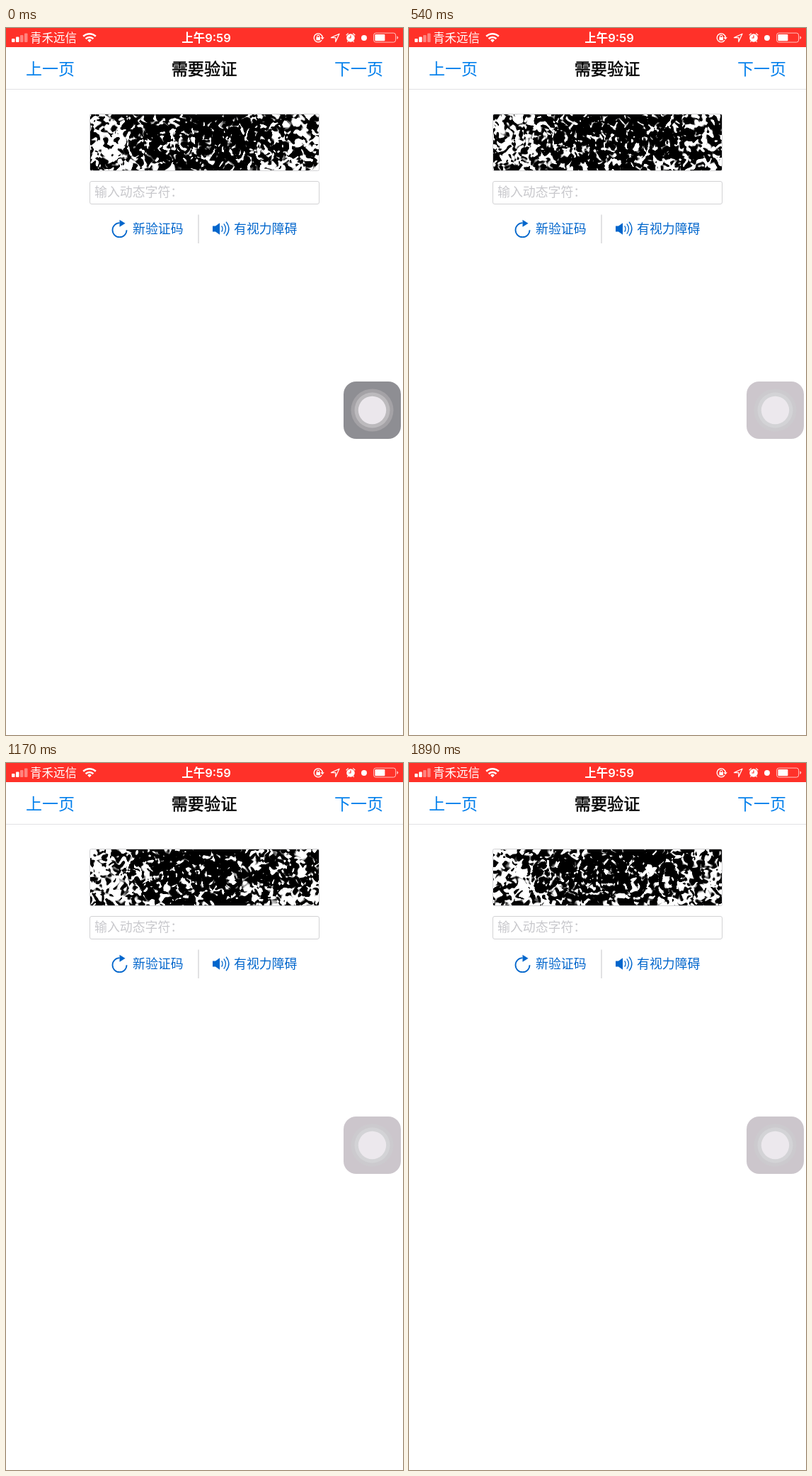
Animation of 561 by 998 pixels, one loop 1920 ms. Source, as an HTML page with a canvas:

```html
<!DOCTYPE html>
<html lang="zh-CN">
<head>
<meta charset="utf-8">
<title>需要验证</title>
<style>
  html, body { margin: 0; width: 100%; height: 100%; overflow: hidden; background: #fff; }
  svg, canvas { position: absolute; display: block; }
  svg { left: 0; top: 0; }
  canvas { left: 119px; top: 122px; }
  text { font-family: Inter, "Noto Sans CJK SC", "Noto Sans CJK", sans-serif; }
  .nav { font-size: 23px; fill: #007fec; font-weight: 300; }
  .title { font-size: 23.2px; font-weight: 500; stroke: #000; stroke-width: .5; }
  .link { font-size: 17.9px; fill: #0066cc; }
  .bar { font-size: 16.5px; fill: #fff; }
  .clock { font-weight: 600; }
</style>
</head>
<body>
<canvas id="noise" width="323" height="79"></canvas>
<svg width="561" height="998" viewBox="0 0 561 998">
  <rect width="561" height="27" fill="#ff3129"/>
  <g fill="#fff">
    <rect x="8" y="15" width="4.5" height="5" rx="1"/>
    <rect x="14" y="12.5" width="4.5" height="7.5" rx="1"/>
    <rect x="20" y="10" width="4.5" height="10" rx="1" opacity=".4"/>
    <rect x="26" y="7.5" width="4.5" height="12.5" rx="1" opacity=".4"/>
  </g>
  <text class="bar" x="34" y="20">青禾远信</text>
  <g fill="none" stroke="#fff" stroke-width="2.6">
    <path d="M109.2 11.8a12.6 12.6 0 0 1 17.6 0"/>
    <path d="M112.6 15.2a7.8 7.8 0 0 1 10.8 0"/>
    <path d="M115.2 17.2a4 4 0 0 1 5.6 0L118 20.2z" fill="#fff" stroke="none"/>
  </g>
  <text class="bar clock" x="283" y="20" text-anchor="middle">上午9:59</text>

  <!-- status icons -->
  <g fill="none" stroke="#fff" stroke-width="1.4">
    <path d="M446.2 17.2a6 6 0 1 1 1-3.6"/>
    <path d="M444.4 13.2h5.4l-2.7 3.2z" fill="#fff" stroke="none"/>
    <rect x="438.4" y="13" width="5.6" height="4.4" fill="#fff" stroke="none"/>
    <path d="M439.6 13v-1.3a1.6 1.6 0 0 1 3.2 0V13" stroke-width="1.1"/>
    <path d="M459.4 13.6L471 8.2l-5.2 11.4v-6z" stroke-width="1.2" stroke-linejoin="round"/>
    <circle cx="487" cy="14" r="5.8" fill="#fff" stroke="none"/>
    <path d="M480.7 10.3l3-2.9M493.3 10.3l-3-2.9M483.4 18.4l-1 1.4M490.6 18.4l1 1.4" stroke-width="1.2"/>
    <path d="M487 10.4V14h-2.8" stroke="#ff3129" stroke-width="1.2"/>
    <circle cx="506" cy="14" r="4" fill="#fff" stroke="none"/>
    <rect x="519.6" y="7.1" width="31" height="13" rx="3" stroke-width="1" stroke-opacity=".7"/>
    <rect x="521.4" y="8.9" width="14" height="9.4" rx="1" fill="#fff" stroke="none"/>
    <path d="M552.3 11.3q2 .6 2 2.3t-2 2.3z" fill="#fff" fill-opacity=".7" stroke="none"/>
  </g>

  <!-- header -->
  <path d="M0 86.5H561" stroke="#e2e2e4"/>
  <text class="nav" x="28" y="66">上一页</text>
  <text class="title" x="280" y="66" text-anchor="middle">需要验证</text>
  <text class="nav" x="464" y="66">下一页</text>

  <!-- form -->
  <g fill="none" stroke="#d2d2d4">
    <rect x="118.5" y="121.5" width="324" height="80" rx="2"/>
    <rect x="118.5" y="216.5" width="324" height="32" rx="2.5"/>
    <path d="M272 263.5V304" stroke-width="1.3"/>
  </g>
  <text x="125" y="238" font-size="17.9" fill="#c8c8cc">输入动态字符：</text>
  <g fill="none" stroke="#0066cc" stroke-width="1.8">
    <path d="M160.5 275.2a10 10 0 1 0 10 10"/>
    <path d="M160.5 270.8l8 5-8 5z" fill="#0066cc" stroke="none"/>
    <path d="M292 279.6h4l6-4.4v16.6l-6-4.4h-4z" fill="#0066cc" stroke="none"/>
    <path d="M304.6 279.4q3 4.1 0 8.2M307.8 276.4q5.4 7.1 0 14.2M311 273.6q7.8 9.9 0 19.8" stroke-width="1.3"/>
  </g>
  <text class="link" x="179" y="290.3">新验证码</text>
  <text class="link" x="322" y="290.3">有视力障碍</text>

  <!-- floating button -->
  <rect class="fade" x="477" y="499" width="81" height="81" rx="18"/>
  <circle class="fade" cx="517.5" cy="539.5" r="30"/>
  <circle class="fade" cx="517.5" cy="539.5" r="25"/>
  <circle class="fade" cx="517.5" cy="539.5" r="19.7"/>
</svg>
<script>
const LOOP = 1920, STEP = 30, FADE = 240;
const canvas = document.getElementById("noise");
const ctx = canvas.getContext("2d");
const W = canvas.width, H = canvas.height;
const image = ctx.createImageData(W, H);

// share of white over the picture, 10 columns by 4 rows
const density = [
  [.60, .48, .22, .18, .16, .16, .18, .28, .42, .50],
  [.66, .60, .22, .16, .18, .16, .16, .28, .45, .44],
  [.56, .66, .32, .22, .18, .10, .18, .34, .44, .48],
  [.32, .48, .50, .38, .26, .14, .20, .62, .52, .48]
];
// ghost characters: centre x, centre y, radius x, radius y
const ghosts = [[67, 37, 13, 22], [98, 35, 12, 21], [133, 39, 13, 24],
  [167, 38, 11, 22], [201, 40, 15, 25], [244, 43, 13, 24]];

// ticks at which the picture keeps the previous pattern
const held = new Set([120, 210, 480, 570, 600, 1740]);
for (let t = 660; t < 1700; t += 90) held.add(t);

const mix = (a, b, k) => a + (b - a) * k;
const ease = k => k * k * (3 - 2 * k);

function hash(x, y, seed) {
  let h = Math.imul(x, 374761393) ^ Math.imul(y, 668265263) ^ Math.imul(seed + 1, 1274126177);
  h = Math.imul(h ^ (h >>> 15), 2246822519);
  h = Math.imul(h ^ (h >>> 13), 3266489917);
  return ((h ^ (h >>> 16)) >>> 0) / 4294967296;
}

function bilinear(x, y, at, curve = k => k) {
  const i = Math.floor(x), j = Math.floor(y), u = curve(x - i), v = curve(y - j);
  return mix(mix(at(i, j), at(i + 1, j), u), mix(at(i, j + 1), at(i + 1, j + 1), u), v);
}

const cloud = (x, y, seed) => bilinear(x, y, (i, j) => hash(i, j, seed), ease);
const share = (i, j) => density[Math.min(j, 3)][Math.min(i, 9)];

// dark strokes with a bright rim
function ghost(x, y, tick) {
  let sum = 0;
  ghosts.forEach(([cx, cy, rx, ry], n) => {
    const a = tick / 64 * 2 * Math.PI + n * 1.7;
    const d = Math.hypot((x - cx - 3 * Math.sin(a)) / rx, (y - cy - 2 * Math.cos(a)) / ry);
    if (d > 1.18) return;
    if (d > 1.02) sum += .09;
    else if (d > .6) sum -= .06;
    else if (d > .4) sum += .07;
  });
  return sum;
}

// specks and patches on a grid that is turned and bent, so that no rows show
function speckle(x, y, tick) {
  const bx = x + 7 * cloud(x / 8, y / 8, tick + 100);
  const by = y + 7 * cloud(x / 8, y / 8, tick + 200);
  const u = .8 * bx + .6 * by, v = .8 * by - .6 * bx;
  return .52 * cloud(u / 3.6, v / 3.6, tick + 300) + .3 * cloud(u / 7, v / 7, tick + 400)
    + .18 * cloud(x / 13, y / 13, 3);
}

function drawNoise(tick) {
  for (let y = 0, p = 0; y < H; y++) {
    for (let x = 0; x < W; x++, p += 4) {
      const white = bilinear(x / W * 9, y / H * 3, share);
      const v = speckle(x, y, tick) - .5 - (.5 - white) * .42 + ghost(x, y, tick);
      const c = Math.max(0, Math.min(255, 128 + v * 2600));
      image.data[p] = image.data[p + 1] = image.data[p + 2] = c;
      image.data[p + 3] = 255;
    }
  }
  ctx.putImageData(image, 0, 0);
}

const parts = [...document.querySelectorAll(".fade")];
const shades = [
  [[142, 142, 147], [204, 198, 204]],
  [[164, 162, 166], [204, 202, 206]],
  [[188, 186, 189], [211, 211, 214]],
  [[235, 231, 236], [236, 232, 237]]
];

let shown = -1;
function render(time) {
  let t = Math.floor(time % LOOP / STEP) * STEP;
  const k = Math.min(1, t / FADE);
  while (held.has(t)) t -= STEP;
  if (t !== shown) {
    shown = t;
    drawNoise(t / STEP);
  }
  parts.forEach((part, i) => {
    const [from, to] = shades[i];
    part.setAttribute("fill", `rgb(${from.map((c, n) => Math.round(mix(c, to[n], k)))})`);
  });
}

const start = performance.now();
function frame() {
  render(performance.now() - start);
  requestAnimationFrame(frame);
}
frame();
</script>
</body>
</html>
```
